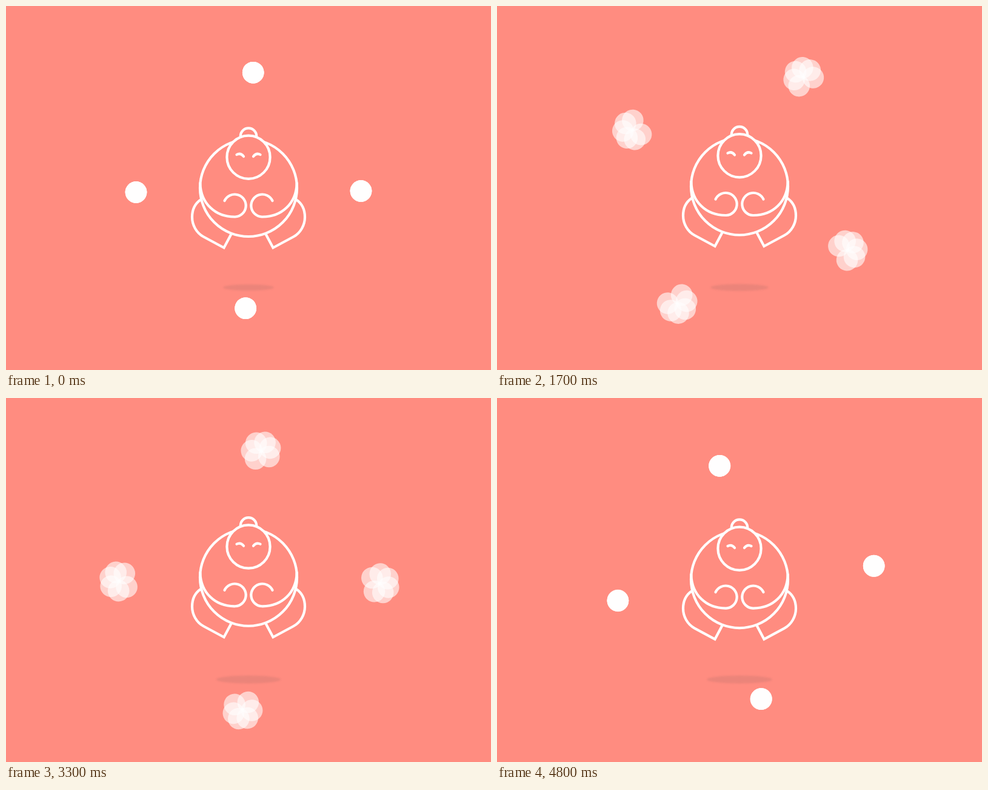
Animation, 800 px wide and 600 px high, one loop 4900 ms. Source, as an HTML page with a canvas:

```html
<!DOCTYPE html>
<html lang="en">
<head>
<meta charset="utf-8">
<title>Meditation</title>
<style>
html, body { margin: 0; width: 100%; height: 100%; overflow: hidden; background: #ff8c80; }
canvas { display: block; width: 800px; height: 600px; }
</style>
</head>
<body>
<canvas id="stage" width="800" height="600"></canvas>
<script>
const ctx = document.getElementById('stage').getContext('2d');
const BG = '#ff8c80';
const LOOP = 4900, STEP = 100, TURN = 5000;
const RAD = Math.PI / 180;
const PETAL = 17.8, SPREAD = 15.3, PUSH = 3.6;

// home: folded dot, pivot: centre of its orbit, out: direction away from the middle
const flowers = [
  { home: [407.7, 109.7], pivot: [403.4, 304.2], out: [0, -1] },
  { home: [585.5, 305],   pivot: [391.1, 301.2], out: [1, 0] },
  { home: [395.2, 498.2], pivot: [399.5, 303.7], out: [0, 1] },
  { home: [214.5, 307],   pivot: [419.5, 311.2], out: [-1, 0] }
];
// uneven pace of the six petals while folding, in degrees
const lag = [-12, -2, 5, 10, -8, -5];

function bezier(x1, y1, x2, y2) {
  const at = (a, b, s) => 3 * a * s * (1 - s) ** 2 + 3 * b * s * s * (1 - s) + s ** 3;
  return x => {
    if (x <= 0) return 0;
    if (x >= 1) return 1;
    let lo = 0, hi = 1;
    for (let i = 0; i < 30; i++) {
      const mid = (lo + hi) / 2;
      if (at(x1, x2, mid) < x) lo = mid; else hi = mid;
    }
    return at(y1, y2, lo);
  };
}
const orbitEase = bezier(0.45, 0, 0.985, 1);
const openEase = bezier(0.42, 0, 0.58, 1);
const foldEase = bezier(0.25, 0, 0.4, 1);
const bobEase = bezier(0.33, 0.05, 0.4, 1);

const leg = new Path2D('M321.5 319C311 326 307 337 307 348C307 361 314 374 326 380.5L359.5 398.5L371.5 376');
const arm = new Path2D('M320.3 292C321 325 345 348 378 347.5A18.5 18.5 0 1 0 360.5 321');
const eye = new Path2D('M380.5 245Q387 241.5 392 248');
const bun = new Path2D('M386.8 216V214.5A13.2 13.2 0 0 1 413.2 214.5V216');

function disc(x, y, r) {
  ctx.beginPath();
  ctx.arc(x, y, r, 0, 2 * Math.PI);
}

function mirrored(path) {
  ctx.stroke(path);
  ctx.save();
  ctx.translate(800, 0);
  ctx.scale(-1, 1);
  ctx.stroke(path);
  ctx.restore();
}

function drawShadow(t) {
  const rx = 42 + 12.5 * Math.abs(Math.sin(Math.PI * t / 2000));
  ctx.save();
  ctx.filter = 'blur(1.5px)';
  ctx.fillStyle = 'rgba(60,70,70,.1)';
  ctx.beginPath();
  ctx.ellipse(400, 464, rx, rx * 0.12, 0, 0, 2 * Math.PI);
  ctx.fill();
  ctx.restore();
}

function drawMonk(t) {
  const phase = t % 1000 / 500;
  const lift = phase < 1 ? bobEase(phase) : 1 - bobEase(phase - 1);
  ctx.save();
  ctx.translate(0, -5.2 * lift);
  ctx.strokeStyle = '#fff';
  ctx.fillStyle = BG;
  ctx.lineWidth = 4.2;
  ctx.lineCap = 'butt';
  mirrored(leg);
  disc(400, 300, 80);
  ctx.fill();
  ctx.stroke();
  ctx.stroke(bun);
  ctx.lineCap = 'round';
  mirrored(arm);
  disc(400, 249.2, 35.6);
  ctx.fill();
  ctx.stroke();
  mirrored(eye);
  ctx.restore();
}

function drawFlower(f, angle, open, fold) {
  const [px, py] = f.pivot, [ox, oy] = f.out;
  const reach = SPREAD + PUSH * open * (1 - fold);
  const inward = Math.atan2(-oy, -ox);
  ctx.save();
  ctx.translate(px, py);
  ctx.rotate(angle);
  ctx.translate(f.home[0] - px + ox * reach, f.home[1] - py + oy * reach);
  lag.forEach((late, k) => {
    const turn = 60 * k * open * (1 - fold) + 360 * fold + late * Math.sin(Math.PI * fold);
    const a = inward + turn * RAD;
    const r = reach + (SPREAD - reach) * open * (1 - fold);
    disc(r * Math.cos(a), r * Math.sin(a), PETAL);
    ctx.fill();
  });
  ctx.restore();
}

function draw(t) {
  ctx.fillStyle = BG;
  ctx.fillRect(0, 0, 800, 600);
  drawShadow(t);
  drawMonk(t);
  const angle = Math.PI * orbitEase(t / TURN);
  const open = openEase((t - 1000) / 1000);
  const fold = foldEase((t - 3000) / 2000);
  ctx.fillStyle = 'rgba(255,255,255,.6)';
  flowers.forEach(f => drawFlower(f, angle, open, fold));
}

function tick() {
  const t = performance.now() % LOOP;
  draw(Math.floor(t / STEP) * STEP);
  requestAnimationFrame(tick);
}
tick();
</script>
</body>
</html>
```
